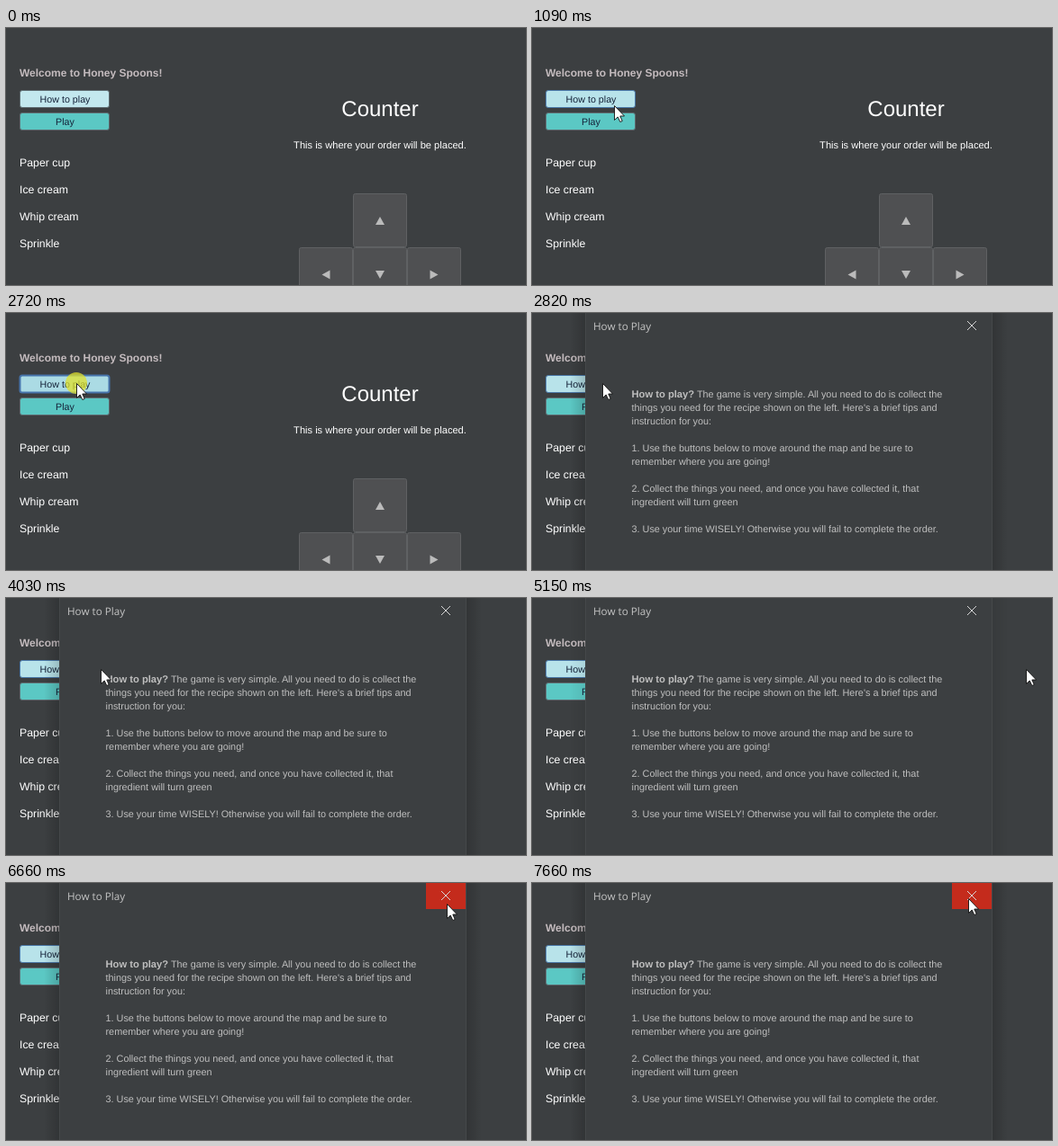
Write an HTML page that moves like this. It is 577 px wide and 286 px high and loops after 8 s.

```html
<!DOCTYPE html>
<html lang="en">
<head>
<meta charset="utf-8">
<style>
  html, body { margin: 0; height: 100%; overflow: hidden; background: #3c3f41; }
  svg { display: block; width: 577px; height: 286px; }
  text { font-family: "Liberation Sans", Arial, sans-serif; fill: #fff; text-rendering: geometricPrecision; }
  .item { font-size: 12.3px; }
  .label { font-size: 10.7px; fill: #16243a; text-anchor: middle; }
  .mid { text-anchor: middle; }
  .body { font-size: 10.85px; fill: #bfbfbf; }
  .key { fill: #4f5052; stroke: #5f6163; }
  .key.hover { fill: #585b5d; }
  .arrow { fill: #bbb; }
  .button { stroke: #5e6b70; }
  #how.hover { fill: #b8e3ea; stroke: #4a78a8; }
  #how.down { fill: #abdbe4; stroke: #4674ab; stroke-width: 2; }
</style>
</head>
<body>
<svg viewBox="0 0 577 286">
  <defs>
    <linearGradient id="shade">
      <stop offset="0" stop-opacity="0"/>
      <stop offset="1" stop-opacity=".18"/>
    </linearGradient>
  </defs>

  <g id="page">
    <text x="15" y="54" font-size="12" font-weight="bold" style="fill:#c4bbbe">Welcome to Honey Spoons!</text>
    <rect id="how" class="button" x="15.5" y="69.5" width="99" height="19" rx="2.5" fill="#c3e8ee"/>
    <text class="label" x="65.5" y="83">How to play</text>
    <rect class="button" x="15.5" y="94.5" width="99" height="19" rx="2.5" fill="#5bc8c4"/>
    <text class="label" x="65.5" y="108">Play</text>
    <text class="mid" x="415" y="98" font-size="24">Counter</text>
    <text class="mid" x="415" y="134" font-size="11.1">This is where your order will be placed.</text>
  </g>

  <g id="dialog">
    <g id="shadow">
      <rect x="42" width="18" height="286" fill="url(#shade)"/>
      <rect x="42" width="18" height="286" fill="url(#shade)" transform="matrix(-1 0 0 1 570 0)"/>
    </g>
    <rect x="59.5" y="-1" width="451" height="290" fill="#3c3f41" stroke="#45484a"/>
    <text x="68" y="19" style="font:11.7px 'Open Sans','Noto Sans',sans-serif;fill:#c4c4c4">How to Play</text>
    <rect id="close" x="466" width="44" height="29" fill="#c42b1c"/>
    <path d="M483 9l10 10m0-10l-10 10" stroke="#d8d8d8"/>
  </g>

  <circle id="click" cx="78" cy="78" r="12" fill="#dfe02c" opacity=".75"/>
  <path id="cursor" d="M.5.5V16.5L4.2 13L6.8 18.5L9.2 17.5L6.8 12H11.5Z" fill="#fff" stroke="#111" stroke-width=".9"/>
</svg>
<script>
  const LOOP = 8000, STEP = 100;
  const $ = id => document.getElementById(id);
  const show = (id, on) => $(id).style.display = on ? "" : "none";
  const add = (id, markup) => $(id).insertAdjacentHTML("beforeend", markup);

  ["Paper cup", "Ice cream", "Whip cream", "Sprinkle"].forEach((item, i) =>
    add("page", `<text class="item" x="15" y="${154 + 30 * i}">${item}</text>`));

  // Arrow keys: column, row, direction in degrees
  [[0, -1, 0], [-1, 0, -90], [1, 0, 90], [0, 0, 180]].forEach(([col, row, turn]) =>
    add("page", `<g transform="translate(${415 + 60 * col} ${274.5 + 60 * row})">
      <rect class="key" x="-29.5" y="-30" width="59" height="59" rx="2"/>
      <path class="arrow" d="M-5 4.5H5L0-4.5Z" transform="rotate(${turn})"/></g>`));
  const downKey = $("page").lastElementChild.firstElementChild;

  `<tspan font-weight="bold" font-size="11.2">How to play?</tspan> The game is very simple. All you need to do is collect the
things you need for the recipe shown on the left. Here's a brief tips and
instruction for you:

1. Use the buttons below to move around the map and be sure to
remember where you are going!

2. Collect the things you need, and once you have collected it, that
ingredient will turn green

3. Use your time WISELY! Otherwise you will fail to complete the order.`
    .split("\n").forEach((line, i) =>
      add("dialog", `<text class="body" x="110.5" y="${94 + 15 * i}">${line}</text>`));

  // Pointer strokes: begin, end, goal x and y, easing
  const speedUp = k => k ** 2.2, slowDown = k => 1 - (1 - k) ** 2;
  const strokes = [
    [490, 690, 428, 252, slowDown],
    [990, 1090, 91, 86, slowDown],
    [1700, 1800, 77, 80, slowDown],
    [2200, 2500, 78, 78, slowDown],
    [4030, 4230, 382, 88, speedUp],
    [4530, 4850, 548, 79, slowDown],
    [5550, 6350, 498, 33, slowDown],
    [6450, 7160, 484, 17, slowDown]
  ];

  // The pointer is seen in steps, the last one landing on the goal
  function pointer(t) {
    let x = 470, y = 286;
    for (const [begin, end, goalX, goalY, ease] of strokes) {
      if (t < begin) break;
      const count = Math.floor((end - begin) / STEP) + 1;
      const k = ease(Math.min(1, (Math.floor((t - begin) / STEP) + 1) / count));
      x += (goalX - x) * k;
      y += (goalY - y) * k;
    }
    return [x, y].map(Math.round);
  }

  function draw(t) {
    const within = (from, to = LOOP) => t >= from && t < to;
    show("cursor", within(490));
    $("cursor").setAttribute("transform", `translate(${pointer(t)})`);
    downKey.classList.toggle("hover", within(590, 990));
    $("how").classList.toggle("hover", within(1090));
    $("how").classList.toggle("down", within(2720, 2820));
    show("click", within(2720, 2820));
    show("dialog", within(2820));
    show("close", within(6450));
    // A click outside the dialog makes its shadow flicker
    const faint = within(5150, 6350) && (t - 5150) % 400 < 200;
    $("shadow").style.opacity = faint ? .4 : 1;
  }

  const start = performance.now();
  (function tick() {
    draw((performance.now() - start) % LOOP);
    requestAnimationFrame(tick);
  })();
</script>
</body>
</html>
```
